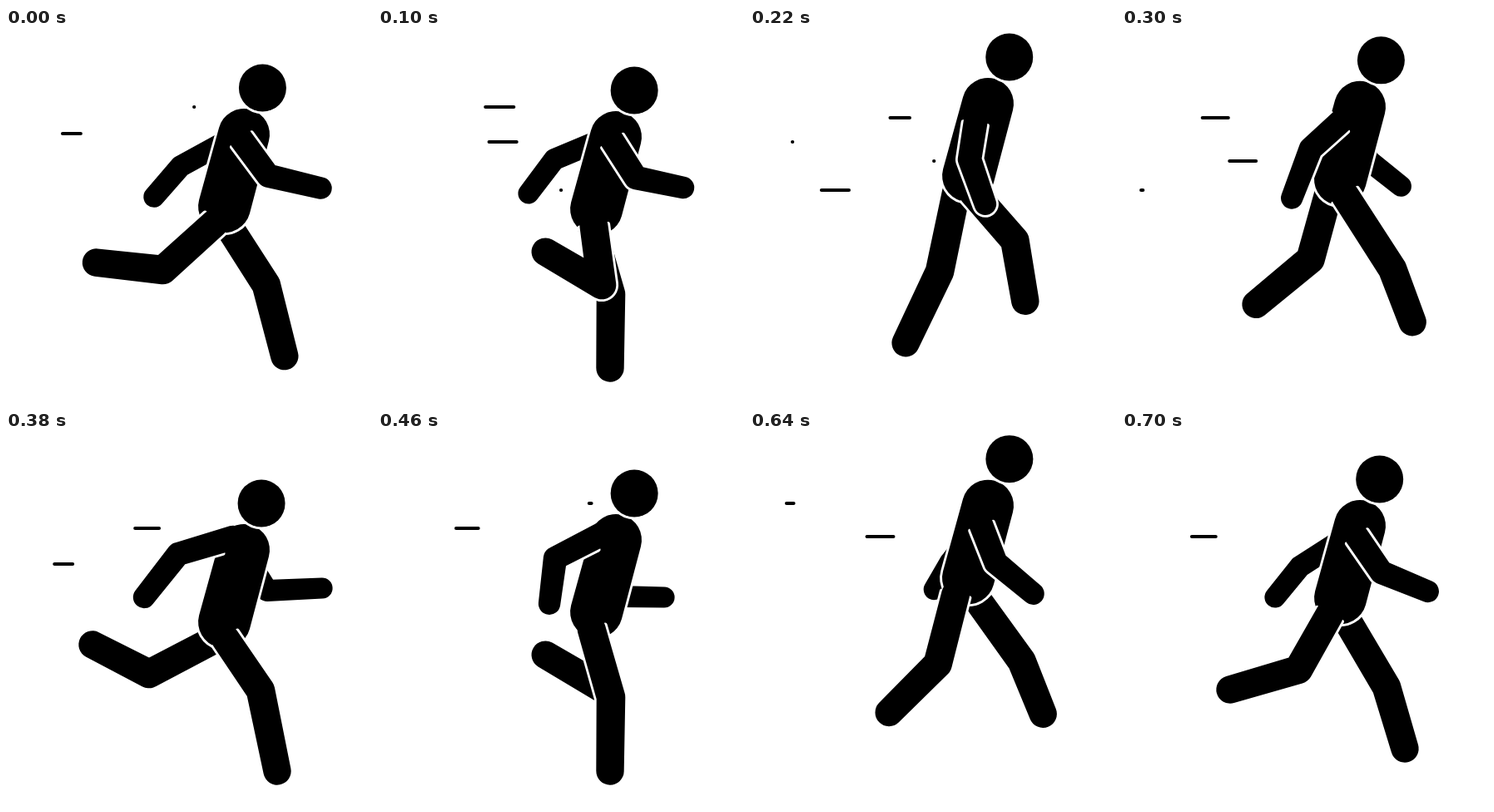
Recreate the animation shown at these times as an HTML page. Size 440 by 451 pixels, loop 0.72 s.

```html
<!DOCTYPE html>
<html lang="en">
<head>
<meta charset="utf-8">
<title>Runner</title>
<style>
  html, body { margin: 0; width: 100%; height: 100%; overflow: hidden; background: #fff; }
  svg { display: block; width: 100%; height: 100%; }
  .gap { fill: none; stroke: #fff; stroke-width: 5.6; stroke-linecap: round; stroke-linejoin: round; }
  .dash { stroke: #000; stroke-width: 4.2; stroke-linecap: round; }
</style>
</head>
<body>
<svg id="stage" viewBox="0 0 440 451"></svg>
<script>
const LOOP = 720, HALF = LOOP / 2, STEP = 20, TURN = 2 * Math.PI;
const stage = document.getElementById('stage');

function add(tag, cls) {
  const el = document.createElementNS('http://www.w3.org/2000/svg', tag);
  if (cls) el.setAttribute('class', cls);
  stage.appendChild(el);
  return el;
}
function set(el, attrs) {
  for (const k in attrs) el.setAttribute(k, attrs[k]);
}

// Smooth curve through rows of [time, ...values], repeating every period
function curve(rows, period) {
  const n = rows.length;
  const row = i => rows[(i + n) % n];
  const time = i => row(i)[0] + period * Math.floor(i / n);
  return now => {
    const t = now % period;
    let i = n - 1;
    while (i >= 0 && rows[i][0] > t) i--;
    const t0 = time(i - 1), t1 = time(i), t2 = time(i + 1), t3 = time(i + 2);
    const h = t2 - t1, u = (t - t1) / h, w = 1 - u;
    return row(i).slice(1).map((b, j) => {
      const a = row(i - 1)[j + 1], c = row(i + 1)[j + 1], d = row(i + 2)[j + 1];
      const v0 = (b - a) / (t1 - t0), v1 = (c - b) / h, v2 = (d - c) / (t3 - t2);
      const m1 = (v0 * h + v1 * (t1 - t0)) / (t2 - t0);
      const m2 = (v1 * (t3 - t2) + v2 * h) / (t3 - t1);
      return b * w * w * (1 + 2 * u) + c * u * u * (3 - 2 * u) + h * u * w * (m1 * w - m2 * u);
    });
  };
}

// The body bobs once per stride; hips and shoulders follow the head
const bob = curve([[0, 72], [20, 87], [100, 75], [200, 41], [220, 35], [340, 58]], HALF);
const headY = t => bob(t)[0];
const hip = t => [258 + 11 * Math.cos(TURN * (t - 265) / LOOP), headY(t) + 163];
const shoulder = t => [273, 83 + 0.52 * headY(t)];
const farShoulder = t => [279, 91 + 0.52 * headY(t)];

// Poses of [time, joint x, y, tip x, y] become bones that turn and stretch
function swing(root, poses) {
  const prev = [];
  const bone = (dx, dy, j) => {
    let a = Math.atan2(dy, dx);
    if (j in prev) a += TURN * Math.round((prev[j] - a) / TURN);
    prev[j] = a;
    return [a, Math.hypot(dx, dy)];
  };
  const move = curve(poses.map(([t, jx, jy, x, y]) => {
    const [rx, ry] = root(t);
    return [t, ...bone(jx - rx, jy - ry, 0), ...bone(x - jx, y - jy, 1)];
  }), LOOP);
  const along = ([x, y], a, len) => [x + len * Math.cos(a), y + len * Math.sin(a)];
  return t => {
    const [a, la, b, lb] = move(t), top = root(t), mid = along(top, a, la);
    return [top, mid, along(mid, b, lb)];
  };
}

const leg = swing(hip, [
  [20, 172, 292, 104, 257],
  [100, 269, 309, 201, 269],
  [210, 316, 258, 321, 332],
  [340, 318, 308, 340, 382],
  [380, 306, 312, 326, 409],
  [460, 280, 320, 279, 409],
  [560, 238, 295, 214, 403],
  [580, 228, 293, 187, 379],
  [700, 212, 287, 130, 311]
]);
const nearArm = swing(shoulder, [
  [40, 318, 190, 391, 188],
  [100, 310, 180, 367, 192],
  [220, 264, 158, 283, 212],
  [380, 207, 148, 166, 200],
  [460, 213, 153, 206, 208],
  [560, 264, 160, 294, 214],
  [700, 312, 170, 368, 193]
]);
const farArm = swing(farShoulder, [
  [100, 212, 158, 181, 199],
  [220, 270, 150, 270, 184],
  [380, 314, 192, 380, 189],
  [460, 290, 199, 344, 200],
  [560, 272, 158, 272, 188],
  [700, 214, 163, 184, 200]
]);

// Tapered capsule, or one without its starting cap
function capsule(a, b, ra, rb, open) {
  const dx = b[0] - a[0], dy = b[1] - a[1], len = Math.hypot(dx, dy) || 1;
  const side = (p, r) => (p[0] - dy / len * r).toFixed(2) + ' ' + (p[1] + dx / len * r).toFixed(2);
  const far = `L${side(b, -rb)}A${rb} ${rb} 0 0 1 ${side(b, rb)}`;
  return open ? `M${side(a, -ra)}${far}L${side(a, ra)}`
              : `M${side(a, ra)}A${ra} ${ra} 0 0 1 ${side(a, -ra)}${far}Z`;
}

// A limb with a gap gets a white edge that starts part of the way down
function limb(joints, [ra, rb, rc], gapFrom) {
  const gap = gapFrom === undefined ? null : add('path', 'gap');
  const ink = add('path');
  return t => {
    const [a, b, c] = joints(t);
    const lower = capsule(b, c, rb, rc);
    set(ink, { d: capsule(a, b, ra, rb) + lower });
    if (!gap) return;
    const start = a.map((v, i) => v + (b[i] - v) * gapFrom);
    set(gap, { d: capsule(start, b, ra, rb, true) + lower });
  };
}

function torso() {
  const parts = [add('path', 'gap'), add('path')];
  return t => {
    const y = headY(t), d = capsule([286, y + 56], [262.5, y + 143], 31, 31.5);
    for (const p of parts) set(p, { d });
  };
}

function head() {
  const parts = [add('circle', 'gap'), add('circle')];
  return t => {
    const y = headY(t);
    for (const p of parts) set(p, { cx: 309.5 - (y - 60) * 0.09, cy: y, r: 28.5 });
  };
}

// A speed line flies left, growing from a dot and shrinking back
function dash([birth, y, x0, speed]) {
  const el = add('line', 'dash'), life = 215, size = 38;
  return t => {
    const age = (t - birth + LOOP) % LOOP, x = x0 - speed * age;
    const half = Math.max(0.05, size * Math.sin(Math.PI * age / life) / 2 - 2);
    set(el, { x1: x - half, x2: x + half, y1: y, y2: y, visibility: age < life ? 'visible' : 'hidden' });
  };
}

const legSize = [17, 17.3, 16.7];
const parts = [
  ...[
    [8, 137, 226, 0.825], [96, 195, 224, 0.98], [165, 108, 227, 0.85], [216, 160, 225, 0.95],
    [309, 117, 225, 0.78], [448, 87, 269, 1.15], [556, 127, 238, 0.97], [714, 95, 231, 0.8]
  ].map(dash),
  limb(farArm, [13, 13, 12.6]),
  limb(t => leg(t + HALF), legSize),
  torso(),
  limb(leg, legSize, 0),
  limb(nearArm, [14.5, 14.2, 13.2], 0.25),
  head()
];

function tick() {
  const t = Math.floor(performance.now() % LOOP / STEP) * STEP;
  for (const draw of parts) draw(t);
  requestAnimationFrame(tick);
}
tick();
</script>
</body>
</html>
```
